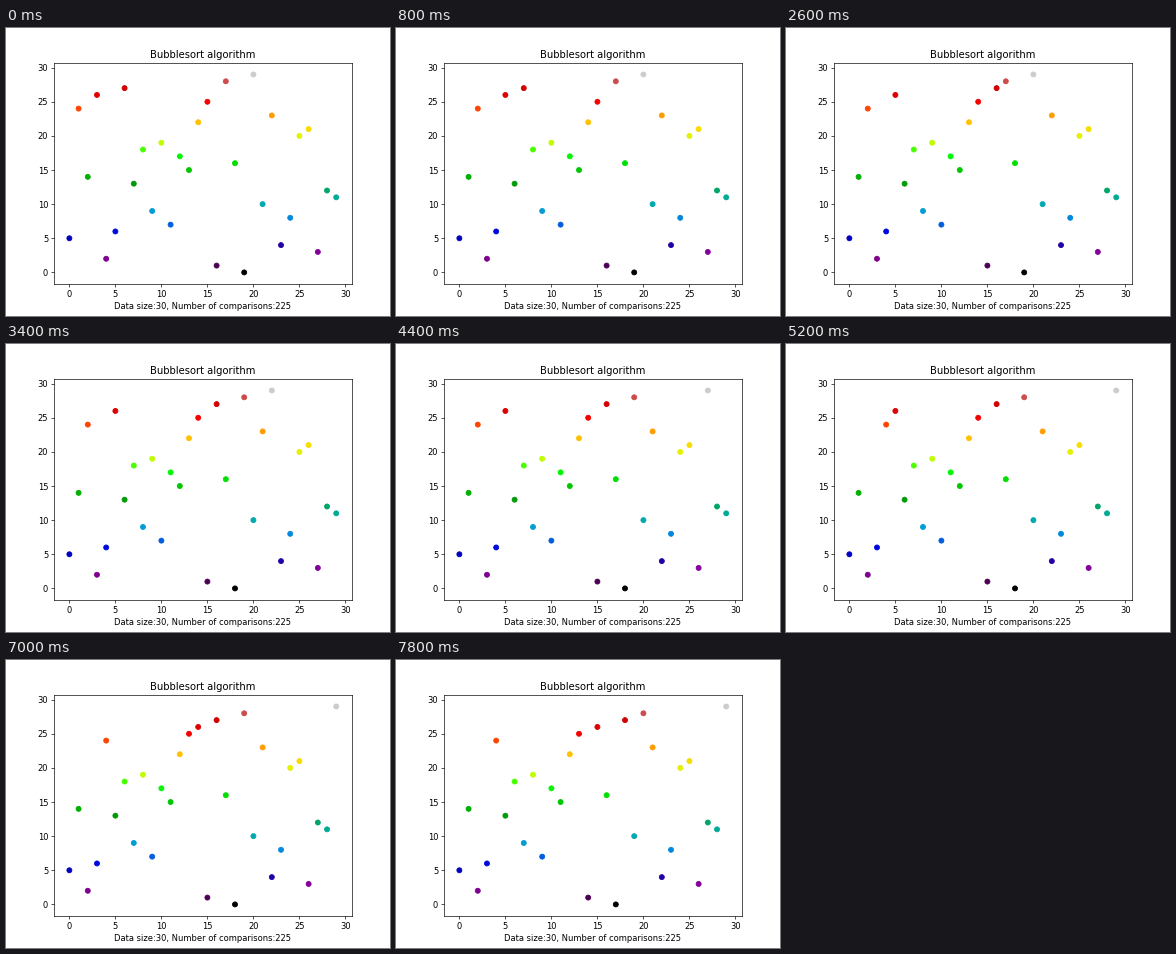
Recreate the animation shown at these times as a matplotlib script. Size 384 by 288 pixels, loop 8 s.

```python
import matplotlib.pyplot as plt
import numpy as np
from matplotlib.animation import FuncAnimation

FRAMES = 40
STEP_MS = 200
# Unsorted input; every later position follows from the sort itself.
START = [5, 24, 14, 26, 2, 6, 27, 13, 18, 9, 19, 7, 17, 15, 22,
         25, 1, 28, 16, 0, 29, 10, 23, 4, 8, 20, 21, 3, 12, 11]


def bubble_states(data):
    """Yield the list before sorting and after every swap."""
    a = list(data)
    yield a[:]
    for end in range(len(a) - 1, 0, -1):
        for j in range(end):
            if a[j] > a[j + 1]:
                a[j], a[j + 1] = a[j + 1], a[j]
                yield a[:]


size = len(START)
values = np.arange(size)
states = list(bubble_states(START))

fig, ax = plt.subplots(figsize=(6.4, 4.8), dpi=60)
# Each dot keeps the colour of its value; only its position changes.
dots = ax.scatter(values, values, s=36, c=values, cmap="nipy_spectral")
pad_x, pad_y = 1.67, 1.745
ax.set_xlim(-pad_x, size - 1 + pad_x)
ax.set_ylim(-pad_y, size - 1 + pad_y)
ticks = range(0, size + 1, 5)
ax.set_xticks(ticks)
ax.set_yticks(ticks)
ax.set_title("Bubblesort algorithm")
ax.set_xlabel(f"Data size:{size}, Number of comparisons:{len(states)}")


def draw(frame):
    positions = np.argsort(states[frame])
    dots.set_offsets(np.column_stack([positions, values]))
    return (dots,)


anim = FuncAnimation(fig, draw, frames=FRAMES, interval=STEP_MS,
                     init_func=lambda: draw(0), repeat=True, repeat_delay=0)
plt.show()
```
